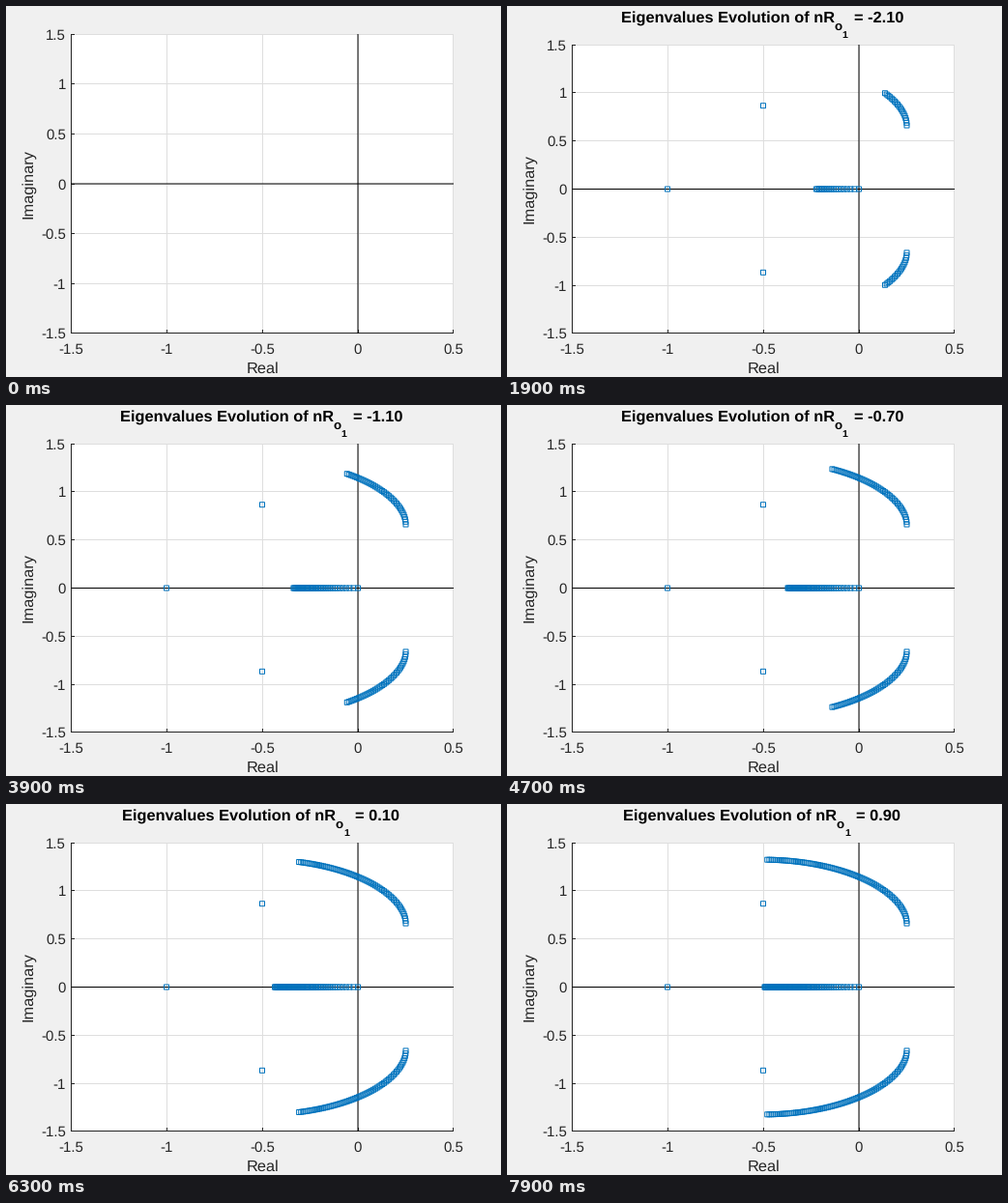
Recreate the animation shown at these times as a matplotlib script. Size 512 px wide and 384 px high, loop 8 s.

```python
import numpy as np
import matplotlib.pyplot as plt
from matplotlib.animation import FuncAnimation
from matplotlib.collections import PolyCollection

W, H, DPI = 512, 384, 100
FRAMES, INTERVAL = 80, 100
PX = 72 / DPI  # points per pixel

LEFT, RIGHT, BOTTOM = 67, 463, 339
XLIM, YLIM = (-1.5, 0.5), (-1.5, 1.5)
INK, GRID, BLUE = "#262626", "#dedede", "#0072bd"
TICK_SIZE, LABEL_SIZE = 15, 16.4
SQUARE = 2.5 * np.array([(-1, -1), (1, -1), (1, 1), (-1, 1)])

plt.rcParams["font.family"] = "Liberation Sans"
plt.rcParams["text.hinting"] = "none"

fig = plt.figure(figsize=(W / DPI, H / DPI), dpi=DPI, facecolor="#f0f0f0")
ax = fig.add_axes([0, 0, 1, 1])


def gain(step):
    return (step - 60) / 20


def moving_roots(r):
    return np.roots([1, 1 + r / 2, 2 + r / 2, (3 + r) / 4])


FIXED = np.roots([1, 2, 2, 1])
MOVING = np.array([moving_roots(gain(k)) for k in range(FRAMES)])


def to_x(v):
    return LEFT + (v - XLIM[0]) / (XLIM[1] - XLIM[0]) * (RIGHT - LEFT)


def to_y(v, top):
    return BOTTOM - (v - YLIM[0]) / (YLIM[1] - YLIM[0]) * (BOTTOM - top)


def line(x0, y0, x1, y1, color):
    """Crisp line through whole pixels, both ends included."""
    ax.plot([x0, x1], [y0, y1], color=color, lw=PX,
            solid_capstyle="projecting")


def smooth_line(x0, y0, x1, y1):
    ax.plot([x0, x1], [y0, y1], color="black", lw=PX,
            solid_capstyle="butt", snap=False)


def text(x, y, s, size, color=INK, **kw):
    ax.text(x, y, s, fontsize=size * PX, color=color, va="baseline", **kw)


def draw_axes(top):
    right, bottom = RIGHT - 1, BOTTOM - 1  # last pixels inside the box
    ax.fill([LEFT, RIGHT, RIGHT, LEFT], [top, top, BOTTOM, BOTTOM],
            color="white", lw=0)
    xs = [(v, min(int(to_x(v)), right)) for v in np.arange(-1.5, 0.6, 0.5)]
    ys = [(v, min(int(to_y(v, top)), bottom))
          for v in np.arange(-1.5, 1.6, 0.5)]

    for _, x in xs:
        line(x, top, x, bottom, GRID)
    for _, y in ys:
        line(LEFT, y, right, y, GRID)

    line(LEFT, top, LEFT, bottom, INK)
    line(LEFT, bottom, right, bottom, INK)
    for v, x in xs:
        line(x, bottom, x, bottom - 3, INK)
        text(to_x(v), 359.5, f"{v:g}", TICK_SIZE, ha="center")
    for v, y in ys:
        line(LEFT, y, LEFT + 3, y, INK)
        text(62, y + 6, f"{v:g}", TICK_SIZE, ha="right")

    zero_x, zero_y = to_x(0), to_y(0, top)
    smooth_line(zero_x, top, zero_x, BOTTOM)
    smooth_line(LEFT, zero_y, RIGHT, zero_y)

    text(265.3, 379.7, "Real", LABEL_SIZE, ha="center")
    text(27.2, (top + BOTTOM) / 2, "Imaginary", LABEL_SIZE, ha="center",
         rotation=90, rotation_mode="anchor")


def draw_title(r):
    shift = 0 if r < 0 else 2.7  # stays centred without the minus sign
    parts = [(117.7, 17, "Eigenvalues Evolution of nR", LABEL_SIZE),
             (338, 25, "o", 13.2),
             (346.8, 33.4, "1", 10.5),
             (358.7, 17, f"= {r:.2f}", LABEL_SIZE)]
    for x, y, s, size in parts:
        text(x + shift, y, s, size, color="black", weight="bold")


def draw_roots(roots, top):
    centers = np.column_stack([to_x(roots.real), to_y(roots.imag, top)])
    ax.add_collection(PolyCollection(
        centers[:, None] + SQUARE, facecolors="none", edgecolors=BLUE,
        linewidths=PX, joinstyle="miter", snap=False, zorder=3),
        autolim=False)


def draw(i):
    ax.clear()
    ax.axis("off")
    ax.set_xlim(0, W)
    ax.set_ylim(H, 0)
    top = 40 if i else 29
    draw_axes(top)
    if i:
        draw_title(gain(i - 1))
        draw_roots(np.concatenate([FIXED, MOVING[:i].ravel()]), top)
    return []


anim = FuncAnimation(fig, draw, frames=FRAMES, interval=INTERVAL,
                     init_func=lambda: [], repeat=True, repeat_delay=0)
plt.show()
```
